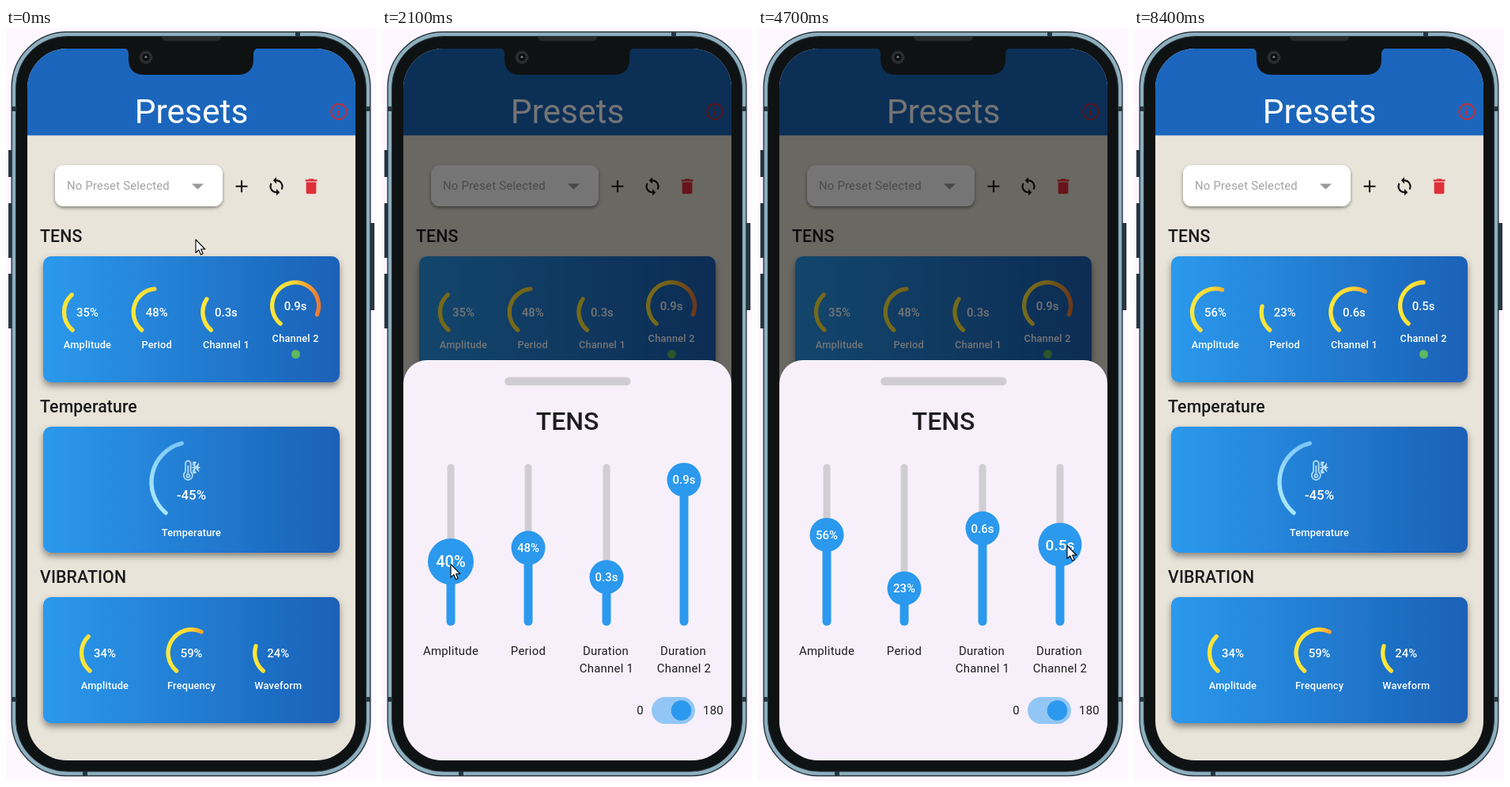
An HTML page for the animation above (8500 ms loop, 468 px wide and 950 px high).

```html
<!DOCTYPE html>
<html lang="en">
<head>
<meta charset="utf-8">
<title>Presets</title>
<style>
  html, body { margin: 0; width: 100%; height: 100%; overflow: hidden; background: #fef7ff; }
  svg { display: block; width: 468px; height: 950px; font-family: Roboto, sans-serif; }
  text { text-anchor: middle; }
  .left { text-anchor: start; }
  .heading { font-size: 21.3px; font-weight: 500; letter-spacing: .1px; fill: #1a191c; }
  .value { font-size: 14.9px; font-weight: 500; fill: #fff; }
  .caption { font-size: 12.8px; font-weight: 500; letter-spacing: .2px; fill: #fff; }
  .label { font-size: 14.9px; letter-spacing: .27px; fill: #1d1b20; }
  .card { fill: url(#cardFill); filter: url(#shadow); }
  .arc { fill: none; stroke-width: 5.3; stroke-linecap: round; }
</style>
</head>
<body>
<svg viewBox="0 0 468 950">
  <defs>
    <linearGradient id="cardFill"><stop stop-color="#2b99ed"/><stop offset="1" stop-color="#1a61b7"/></linearGradient>
    <linearGradient id="warm" gradientUnits="userSpaceOnUse" x1="-32" x2="32">
      <stop stop-color="#fee83a"/><stop offset=".45" stop-color="#fbd837"/>
      <stop offset=".65" stop-color="#f7b133"/><stop offset="1" stop-color="#ec7433"/>
    </linearGradient>
    <linearGradient id="cool" gradientUnits="userSpaceOnUse" x1="0" x2="0" y1="-50" y2="42">
      <stop stop-color="#7cc7f6"/><stop offset=".5" stop-color="#9fe0fb"/><stop offset="1" stop-color="#a8e8fc"/>
    </linearGradient>
    <filter id="shadow" x="-10%" y="-20%" width="120%" height="150%">
      <feDropShadow dx="0" dy="4.500" stdDeviation="4" flood-opacity=".42"/>
    </filter>
    <filter id="softShadow" x="-10%" y="-20%" width="120%" height="150%">
      <feDropShadow dx="0" dy="2" stdDeviation="2.200" flood-opacity=".45"/>
    </filter>
    <clipPath id="screen"><rect x="27" y="26" width="415" height="898" rx="50"/></clipPath>
  </defs>

  <!-- phone body -->
  <g fill="#263640">
    <path d="M3 154h5v34h-5zM3 221h5v69h-5zM3 310h5v69h-5zM461 246h5v110h-5z"/>
    <rect x="7.2" y="5" width="453.6" height="938.5" rx="70" fill="#8fafbf" stroke="#263640" stroke-width="1.4"/>
    <path d="M7 99h6v6h-6zM455 99h6v6h-6zM7 844h6v6h-6zM455 844h6v6h-6zM366 5h6v6h-6zM97 937h6v6h-6z"/>
    <rect x="12.5" y="10.5" width="443" height="927.5" rx="65" fill="#0f1213" stroke="#263640"/>
  </g>

  <g clip-path="url(#screen)">
    <path fill="#e8e4d9" d="M27 26h415v898H27z"/>
    <path fill="#1b66bc" d="M27 26h415v109.500H27z"/>
    <text x="234.500" y="120" font-size="42.500" fill="#fff">Presets</text>
    <g fill="none" stroke="#c42b3a" stroke-width="2">
      <circle cx="421" cy="105.500" r="9.700"/><path d="M421 104v6.500M421 100v2.200"/>
    </g>
    <rect x="62" y="173" width="212" height="52" rx="11" fill="#fff" filter="url(#softShadow)"/>
    <text class="left" x="77" y="204" font-size="14.900" letter-spacing=".2" fill="#a3a3a3">No Preset Selected</text>
    <path fill="#999" d="M235 196.500h15l-7.500 7z"/>
    <g id="icons"></g>
    <text class="heading left" x="43" y="270">TENS</text>
    <text class="heading left" x="43" y="485">Temperature</text>
    <text class="heading left" x="43" y="700">VIBRATION</text>
    <rect class="card" x="47" y="288" width="375" height="159" rx="10"/>
    <rect class="card" x="47" y="503" width="375" height="159" rx="10"/>
    <rect class="card" x="47" y="718" width="375" height="159" rx="10"/>
    <circle cx="366.500" cy="411.500" r="5.500" fill="#5eb75c"/>
    <g id="gauges"></g>
    <g fill="none" stroke="#b9dff9" stroke-width="1.700">
      <path d="M227 560v-10.500a3.300 3.300 0 0 1 6.600 0V560a5.600 5.600 0 1 1-6.600 0M230.300 552v11"/>
      <circle cx="230.300" cy="565" r="2"/>
      <path d="M238.500 547v15M235 554.500h10.500M236 549.500l8 10M244 549.500l-8 10M236.500 547.500l2 2 2-2M236.500 561.500l2-2 2 2M243.500 552.500l-2 2 2 2"/>
    </g>
    <path id="scrim" d="M27 26h415v898H27z"/>
    <g id="sheet"></g>
  </g>

  <!-- notch -->
  <path fill="#0f1213" d="M148 25q7 1 7 8v6q0 20 20 20h118q20 0 20-20v-6q0-7 7-8z"/>
  <path fill="#27292b" d="M197 11h75q-1 5.500-6 5.500h-63q-5 0-6-5.500z"/>
  <circle cx="177" cy="37" r="8.500" fill="#282a2c"/>
  <circle cx="177" cy="37" r="5.500" fill="#0c0e10" stroke="#3c3f42"/>
  <circle cx="177" cy="36.500" r="1.500" fill="#777d82"/>

  <path id="cursor" fill="#fff" stroke="#000" stroke-width="1.100" stroke-linejoin="round"
        d="M0 0V16.500L3.800 13 6.500 19 9.200 17.800 6.600 12H11.800Z"/>
</svg>

<script>
const LOOP = 8500, STEP = 100;
const OPEN_AT = 979, CLOSE_AT = 6650, TOGGLE_AT = 5500;
const ARC_START = 130, ARC_RANGE = 280;
const el = id => document.getElementById(id);
const clamp = u => Math.max(0, Math.min(1, u));
const ramp = (t, start, length) => clamp((t - start) / length);
const mix = (a, b, u) => a + (b - a) * u;
const smooth = u => u * u * (3 - 2 * u);
const text = (cls, x, y, s) => `<text class="${cls}" x="${x}" y="${y}">${s}</text>`;
const percent = v => Math.round(v) + '%';
const seconds = v => (v / 100).toFixed(1) + 's';

const sliders = [
  { x: 87, name: ['Amplitude'], from: 35, to: 56, press: 1850, start: 1950, end: 2450, show: percent },
  { x: 185, name: ['Period'], from: 48, to: 23, press: 2700, start: 2750, end: 3050, show: percent },
  { x: 284, name: ['Duration', 'Channel 1'], from: 30, to: 60, press: 3500, start: 3550, end: 3950, show: seconds },
  { x: 382, name: ['Duration', 'Channel 2'], from: 90, to: 50, press: 4250, start: 4300, end: 4700, show: seconds }
];

// time, x, y of the pointer tip
const pointerPath = [
  [0, 240, 267], [200, 240, 267], [800, 289, 393], [1300, 289, 393], [1800, 87, 686],
  [1950, 87, 686], [2450, 87, 643], [2700, 190, 652], [2750, 190, 652], [3050, 190, 702],
  [3150, 190, 702], [3500, 288, 696], [3550, 288, 696], [3950, 288, 635], [4250, 391, 572],
  [4300, 391, 572], [4700, 391, 653], [4900, 391, 655], [5350, 371, 863], [5700, 371, 863],
  [6400, 322, 409], [7300, 322, 409]
];

function pointerAt(t) {
  const i = Math.max(1, pointerPath.findIndex(k => k[0] >= t));
  const [a, b] = [pointerPath[i - 1], pointerPath[i]];
  const u = smooth(ramp(t, a[0], b[0] - a[0]));
  return [mix(a[1], b[1], u), mix(a[2], b[2], u)];
}

function gauge(x, y, value, label, name, cool) {
  const r = cool ? 50.5 : 29.5;
  const point = degrees => {
    const a = degrees * Math.PI / 180;
    return `${r * Math.cos(a)} ${r * Math.sin(a)}`;
  };
  const sweep = ARC_RANGE * value / 100;
  return `<g transform="translate(${x} ${y})">
    <path class="arc" stroke="url(#${cool ? 'cool' : 'warm'})"
      d="M${point(ARC_START)}A${r} ${r} 0 ${+(sweep > 180)} 1 ${point(ARC_START + sweep)}"/>
    <g ${cool ? 'transform="translate(0 16) scale(1.13)"' : ''}>${text('value', 0, 5.5, label)}</g>
    ${text('caption', 0, cool ? 68 : 45.5, name)}</g>`;
}

function drawGauges(updated) {
  const names = ['Amplitude', 'Period', 'Channel 1', 'Channel 2'];
  const tens = sliders.map((s, i) => {
    const v = updated ? s.to : s.from;
    return gauge(103 + 87.7 * i, i === 3 ? 350.5 : 358.5, v, s.show(v), names[i]);
  });
  const vibration = [['Amplitude', 34], ['Frequency', 59], ['Waveform', 24]].map(
    ([name, v], i) => gauge(125 + 109.6 * i, 788.5, v, percent(v), name));
  return tens.join('') + gauge(234.5, 573, 45, '-45%', 'Temperature', true) + vibration.join('');
}

function drawSlider(s, t) {
  const u = smooth(ramp(t, s.start, s.end - s.start));
  const value = mix(s.from, s.to, u);
  const y = 754 - 2.045 * value;
  const grown = ramp(t, s.press, 150) * (1 - ramp(t, s.end - 50, 250));
  const scale = 1 + 0.35 * grown;
  const lines = s.name.map((line, i) =>
    text('label', s.x - (s.name.length > 1 && i === 0 ? 1 : 0), 791 + 22 * i, line));
  return `<rect x="${s.x - 4.5}" y="550" width="9" height="204" rx="4.5" fill="#d1ced3"/>
    <path d="M${s.x} ${y}V748.5" stroke="#2b99ee" stroke-width="11" stroke-linecap="round"/>
    <g transform="translate(${s.x} ${y}) scale(${scale})">
      <circle r="21.5" fill="#2b99ee"/>${text('value', 0, 5.3, s.show(value))}</g>` + lines.join('');
}

function drawToggle(t) {
  const off = smooth(ramp(t, TOGGLE_AT, 250));
  const x = mix(378.5, 357.5, off);
  const track = off < 0.5
    ? '<rect x="341" y="844" width="55" height="34" rx="17" fill="#92c7f5"/>'
    : `<rect x="342" y="845" width="53" height="32" rx="16" fill="#e6e0e9" stroke="#79747e" stroke-width="2"/>
       <path d="M354 877h30" stroke="#cf5348" stroke-width="2"/>`;
  const thumb = `<circle cx="${x}" cy="861" r="${mix(12.8, 8.5, off)}" fill="${off < 0.5 ? '#2b99ee' : '#cb5a4d'}"/>`;
  const core = off < 0.5 ? '' : `<circle cx="${x}" cy="861" r="4.5" fill="#7b777d"/>`;
  return text('label', 326.5, 866, '0') + track + thumb + core + text('label', 419, 866, '180');
}

function drawSheet(t) {
  return `<path d="M27 924V449a30 30 0 0 1 30-30H412a30 30 0 0 1 30 30V924z" fill="#f7f0fa"/>
    <rect x="155" y="440.5" width="159.500" height="10.500" rx="5.250" fill="#d0cdd2"/>
    <text x="234.500" y="506.500" font-size="32" font-weight="500" fill="#1d1b20">TENS</text>`
    + sliders.map(s => drawSlider(s, t)).join('') + drawToggle(t);
}

const icon = (x, color, d) =>
  `<path transform="translate(${x - 12.75} 187) scale(1.064)" fill="${color}" d="${d}"/>`;
el('icons').innerHTML =
  icon(298, '#111', 'M19 13h-6v6h-2v-6H5v-2h6V5h2v6h6z') +
  icon(342, '#111', 'M12 4V1L8 5l4 4V6c3.310 0 6 2.690 6 6 0 1-.25 1.970-.7 2.800l1.460 1.460A8 8 0 0 0 12 4zm0 14c-3.310 0-6-2.690-6-6 0-1 .25-1.970.7-2.800L5.240 7.740A8 8 0 0 0 12 20v3l4-4-4-4z') +
  icon(386, '#e02f39', 'M6 19c0 1.100.9 2 2 2h8c1.100 0 2-.9 2-2V7H6zM19 4h-3.500l-1-1h-5l-1 1H5v2h14z');

function render(t) {
  const opened = 1 - (1 - ramp(t, OPEN_AT, 250)) ** 3;
  const closed = smooth(ramp(t, CLOSE_AT, 250));
  const shown = opened * (1 - closed);
  el('gauges').innerHTML = drawGauges(t >= CLOSE_AT + 250);
  el('scrim').setAttribute('fill-opacity', 0.54 * shown);
  el('sheet').setAttribute('transform', `translate(0 ${505 * (1 - shown)})`);
  el('sheet').innerHTML = shown > 0 ? drawSheet(t) : '';
  const visible = t <= 7300;
  el('cursor').setAttribute('visibility', visible ? 'visible' : 'hidden');
  if (visible) el('cursor').setAttribute('transform', `translate(${pointerAt(t)})`);
}

let drawn = -1;
function tick() {
  const t = Math.floor(performance.now() % LOOP / STEP) * STEP;
  if (t !== drawn) render(drawn = t);
  requestAnimationFrame(tick);
}
tick();
</script>
</body>
</html>
```
